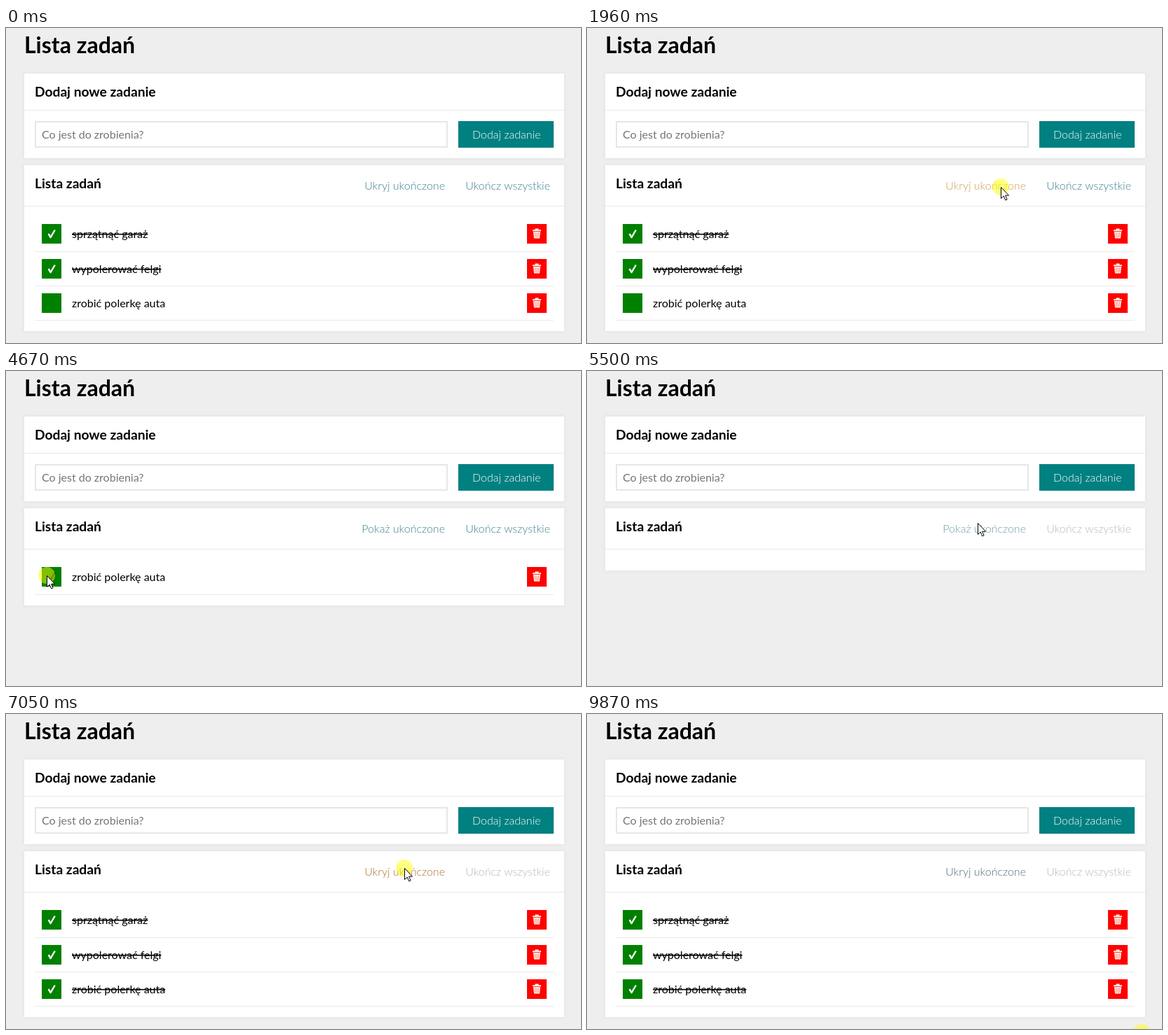
Animation of 820x450 px, one loop 9940 ms. Source, as an HTML page:

```html
<!DOCTYPE html>
<html lang="pl">
<head>
<meta charset="utf-8">
<title>Lista zadań</title>
<style>
  html, body { margin: 0; width: 100%; height: 100%; overflow: hidden; background: #eee; }
  svg { display: block; width: 820px; height: 450px; font: 16px Lato, sans-serif; }
  .panel { fill: #fff; filter: drop-shadow(0 0 2px #ddd); }
  .rule { fill: #eaeaea; }
  h1, .h1 { font-weight: 700; font-size: 32px; }
  .h2 { font-weight: 700; font-size: 19.2px; }
  .light { font-weight: 300; }
  .end { text-anchor: end; }
  .done { text-decoration: line-through; }
</style>
</head>
<body>
<svg viewBox="0 0 820 450">
  <defs>
    <g id="bin">
      <rect width="28" height="28" fill="#f00"/>
      <path d="M8 8.2h12v2H8zM11.5 6.4h5v2h-5zM9 11h10l-1 9.5h-8z" fill="#fff3e6"/>
      <path d="M11.5 12.2l.4 7M14 12.2v7M16.5 12.2l-.4 7" stroke="#f66" stroke-width=".8"/>
    </g>
  </defs>
  <rect width="820" height="450" fill="#eee"/>
  <text class="h1" x="26" y="36">Lista zadań</text>

  <rect class="panel" x="26" y="65" width="770" height="121"/>
  <text class="h2" x="41" y="97.5">Dodaj nowe zadanie</text>
  <rect class="rule" x="26" y="117" width="770" height="1"/>
  <rect x="42" y="134" width="587" height="36" fill="#fff" stroke="#e6e6e6" stroke-width="2"/>
  <text x="51" y="158" fill="#757575">Co jest do zrobienia?</text>
  <rect x="645" y="133" width="136" height="38" fill="#008080"/>
  <text class="light" x="665" y="158" fill="#fff">Dodaj zadanie</text>

  <rect class="panel" id="list" x="26" y="196" width="770" height="237"/>
  <text class="h2" x="41" y="229">Lista zadań</text>
  <rect class="rule" x="26" y="254" width="770" height="1"/>
  <text class="light end" id="toggle" x="626" y="231">Ukryj ukończone</text>
  <text class="light end" id="all" x="776" y="231">Ukończ wszystkie</text>
  <g id="rows"></g>

  <circle id="halo" r="12" fill="#ff0" fill-opacity=".5"/>
  <path id="arrow" d="M.5.5v16l3.7-3.5 2.5 5.9 2.4-1-2.5-5.7h4.9z" fill="#fff" stroke="#000"/>
</svg>
<script>
const LOOP = 9940;
const $ = id => document.getElementById(id);
const tasks = ['sprzątnąć garaż', 'wypolerować felgi', 'zrobić polerkę auta'];

$('rows').innerHTML = tasks.map(name => `<g>
  <rect x="51" width="28" height="28" fill="green"/>
  <path class="tick"/>
  <text x="94" y="20">${name}</text>
  <use href="#bin" x="743"/>
  <rect class="rule line" x="41" width="740" height="1"/>
</g>`).join('');
const rows = [...$('rows').children];

const thinTick = 'M59.5 14.6l2.2-1.2 1.9 3.3 5.2-8.6 2 1-6.6 11.2h-1.4z';
const boldTick = 'M58 15.2l3-1.8 2 2.8 5.4-8 2.8-.4-7 12.4-2.6.4z';

// [start, list state]: rows shown and whether the last task is done
const states = [
  [0, { first: 0, count: 3, done: false }],
  [2160, { first: 2, count: 1, done: false }],
  [4730, { first: 0, count: 0, done: true }],
  [5780, { first: 0, count: 3, done: true }],
  [7180, { first: 0, count: 0, done: true }],
  [8570, { first: 0, count: 3, done: true }]
];

// [start, colour of the toggle link]
const tints = [
  [0, '#3f7f93'], [1430, '#6fa3ac'], [1960, '#d0a050'], [2160, '#9db8ba'],
  [3690, '#3f7f93'], [5500, '#6f9fa8'], [5640, '#b07030'], [5780, '#6f9fa8'],
  [7050, '#b07030'], [7180, '#6f9fa8'], [8440, '#b07030'], [8570, '#6f9fa8'],
  [9240, '#4a7078']
];

const presses = [[1960, 2160], [4600, 4730], [5640, 5780], [7050, 7180], [8440, 8570], [9870, LOOP]];

const inOut = u => u * u * (3 - 2 * u);
const out = u => 1 - (1 - u) ** 2;

// start, end, from, to, bend and easing of each pointer move
const moves = [
  { a: 530, b: 1500, from: [722, 428], to: [590, 228], bend: [612, 285], ease: inOut },
  { a: 1630, b: 1630, from: [590, 228], to: [590, 227] },
  { a: 3480, b: 4530, from: [590, 227], to: [58, 292], bend: [330, 262], ease: inOut },
  { a: 4730, b: 5570, from: [58, 292], to: [566, 217], bend: [330, 224], ease: inOut },
  { a: 6440, b: 6650, from: [566, 217], to: [568, 220], ease: out },
  { a: 9100, b: 9870, from: [568, 220], to: [791, 455], bend: [650, 300], ease: inOut }
];

const latest = (list, t) => list.filter(e => e[0] <= t).pop()[1];

function pointer(t) {
  const m = moves.filter(e => e.a <= t).pop();
  if (!m) return null;
  if (t >= m.b) return m.to;
  const step = Math.floor((t - m.a) / 70 + 0.02) * 70;
  const u = m.ease(step / (m.b - m.a));
  return m.from.map((p, i) => {
    const mid = m.bend ? m.bend[i] : (p + m.to[i]) / 2;
    return (1 - u) ** 2 * p + 2 * u * (1 - u) * mid + u * u * m.to[i];
  }).map(Math.round);
}

function show(el, on) { el.style.display = on ? '' : 'none'; }

function drawList({ first, count, done }) {
  $('list').setAttribute('height', count === 3 ? 237 : count ? 139 : 89);
  $('toggle').textContent = count === 3 ? 'Ukryj ukończone' : 'Pokaż ukończone';
  $('all').setAttribute('fill', done ? '#b8b8b8' : '#3f7f93');
  rows.forEach((row, i) => {
    const slot = i - first;
    show(row, slot >= 0 && slot < count);
    const y = 280 + Math.round(49.5 * slot);
    row.setAttribute('transform', `translate(0 ${y})`);
    row.querySelector('.line').setAttribute('y', 319 + 49 * slot - y);
    const checked = i < 2 || done;
    const tick = row.querySelector('.tick');
    show(tick, checked || count === 1);
    tick.setAttribute('d', checked ? thinTick : boldTick);
    tick.setAttribute('fill', checked ? '#fff' : '#061f06');
    row.querySelector('text').setAttribute('class', checked ? 'done' : '');
  });
}

let current;
function draw(now) {
  const t = now % LOOP;
  const state = latest(states, t);
  if (state !== current) drawList(current = state);
  $('toggle').setAttribute('fill', latest(tints, t));
  const pos = pointer(t);
  show($('arrow'), pos);
  show($('halo'), pos && presses.some(([a, b]) => t >= a && t < b));
  if (pos) for (const id of ['arrow', 'halo']) $(id).setAttribute('transform', `translate(${pos})`);
  requestAnimationFrame(draw);
}
draw(performance.now());
</script>
</body>
</html>
```
